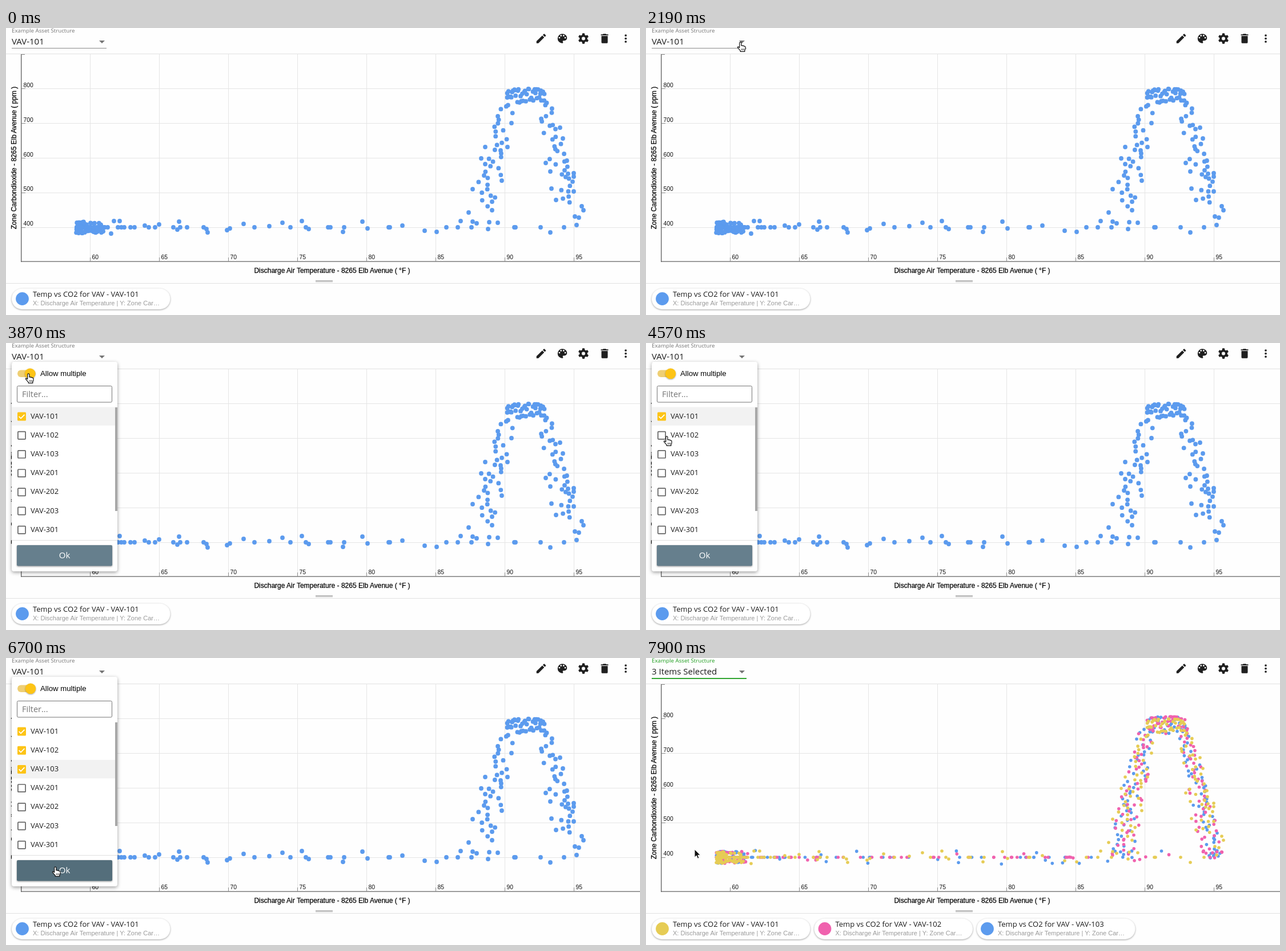
Write an HTML page that moves like this. It is 1110x504 px and loops after 7.99 s.

```html
<!DOCTYPE html>
<html lang="en">
<head>
<meta charset="utf-8">
<title>Scatter chart with asset picker</title>
<style>
  html, body { margin: 0; width: 100%; height: 100%; overflow: hidden; background: #fefefe; }
  svg { display: block; width: 1110px; height: 504px; }
  text { font-family: "Open Sans", "Noto Sans", sans-serif; font-size: 13px; fill: #1c1c1c; white-space: pre; }
  .axis { font-family: "Liberation Sans", Arial, sans-serif; font-size: 12px; fill: #000; }
  .title { stroke: #000; stroke-width: .25px; }
  .tick { font-size: 10.4px; fill: #111; }
  .sub { font-size: 11px; fill: #9a9a9a; }
  .chip { filter: drop-shadow(0 1px 1.5px rgba(0,0,0,.36)); }
  .panel { filter: drop-shadow(0 2px 3px rgba(0,0,0,.38)); }
</style>
</head>
<body>
<svg id="stage" viewBox="0 0 1110 504"></svg>
<script>
const LOOP = 7990;
const BLUE = '#5c9bee', PINK = '#f062ae', GOLD = '#e6cc55', AMBER = '#fdc416';
const PLACE = '8265 Elb Avenue';

const stage = document.getElementById('stage');

function el(tag, attrs, parent = stage, content) {
  const node = document.createElementNS('http://www.w3.org/2000/svg', tag);
  for (const key in attrs) node.setAttribute(key, attrs[key]);
  if (content !== undefined) node.textContent = content;
  parent.appendChild(node);
  return node;
}
const group = (parent = stage, attrs = {}) => el('g', attrs, parent);
const rect = (x, y, width, height, fill, parent, more) => el('rect', { x, y, width, height, fill, ...more }, parent);
const dot = (cx, cy, r, fill, parent) => el('circle', { cx, cy, r, fill }, parent);
const label = (x, y, str, parent, more) => el('text', { x, y, ...more }, parent, str);
const show = (node, on) => node.setAttribute('visibility', on ? 'inherit' : 'hidden');

function random(seed) {
  return () => {
    seed = (seed + 0x6D2B79F5) | 0;
    let t = Math.imul(seed ^ (seed >>> 15), 1 | seed);
    t = (t + Math.imul(t ^ (t >>> 7), 61 | t)) ^ t;
    return ((t ^ (t >>> 14)) >>> 0) / 4294967296;
  };
}

/* ---- Chart frame ---- */
rect(0, 45, 1110, 1, '#e2e2e2');
const grid = group(), outerGrid = group();
for (let i = 0; i < 5; i++) rect(27, 106 + i * 61, 1083, 1, '#e5e5e5', i % 4 ? grid : outerGrid);
for (let i = 0; i < 8; i++) rect(147 + i * 121, 46, 1, 364, '#e5e5e5', i % 7 ? grid : outerGrid);
rect(26, 46, 1.4, 365, '#6a6a6a');
rect(26, 409.4, 1084, 1.3, '#6a6a6a');
rect(27, 46, 6, 1, '#8a8a8a');
for (let i = 0; i < 5; i++) {
  rect(27, 106 + i * 61, 7, 1, '#8a8a8a');
  label(30.5, 104 + i * 60.8, 800 - i * 100, stage, { class: 'axis tick' });
}
for (let i = 0; i < 8; i++) {
  rect(147 + i * 121, 403, 1, 7, '#8a8a8a');
  label(150.5 + i * 121, 406, 60 + i * 5, stage, { class: 'axis tick' });
}
label(571, 430, `Discharge Air Temperature - ${PLACE} ( °F )`, stage, { class: 'axis title', 'text-anchor': 'middle' });
label(0, 0, `Zone Carbondioxide - ${PLACE} ( ppm )`, stage,
  { class: 'axis title', 'text-anchor': 'middle', transform: 'translate(17.6 228) rotate(-90)' });
rect(542, 443, 30, 1, '#999');
rect(542, 445, 30, 1, '#999');
rect(0, 448, 1110, 1, '#e2e2e2');

/* ---- Points ---- */
const floorXs = [173, 178, 196, 202, 207, 218, 225, 250, 261, 293, 305, 317, 435, 498,
  564, 568, 592, 670, 672, 771, 791, 815, 890, 892, 936, 977];
const strays = [
  [184, 361], [189, 339], [199, 339], [243, 347], [268, 345], [300, 354], [303, 340], [346, 350],
  [351, 353], [353, 359], [387, 355], [392, 352], [416, 344], [461, 348], [484, 342], [518, 339],
  [525, 350], [530, 353], [590, 358], [624, 340], [633, 352], [694, 347], [733, 356], [754, 358],
  [796, 339], [810, 324], [817, 283], [817, 340], [824, 343], [832, 229], [839, 209], [839, 239],
  [837, 259], [844, 353], [846, 341], [861, 342], [851, 305], [851, 320], [868, 268], [866, 215],
  [878, 209], [885, 167], [945, 237], [953, 252], [955, 282], [963, 302], [982, 233], [994, 255],
  [994, 261], [994, 287], [984, 256], [1008, 313], [1011, 320], [996, 331], [1003, 333], [999, 346],
  [953, 359], [970, 175], [975, 194]
];

// Dense patch at the cool end: a solid middle row with looser rows around it
function cluster(rnd, n) {
  return Array.from({ length: n }, (_, i) => {
    const x = 123 + rnd() * (i % 3 ? 49 : 15);
    const y = i % 5 < 2 ? 350 : 350 + (rnd() < 0.5 ? -1 : 1) * (3 + 7.5 * rnd());
    return [x, y];
  });
}

// One flank of the arch; u runs from the crest (0) to the foot (1)
function flank(rnd, n, side, top, bottom) {
  return Array.from({ length: n }, (_, i) => {
    const y = top + (bottom - top) * (i + rnd()) / n;
    const u = (y - 107) / 243;
    const outer = side < 0 ? 870 - 80 * u + 20 * u * u : 948 + 70 * u;
    const inner = side < 0 ? 893 - 30 * u - 12 * u * u : 925 + 50 * u;
    return [outer + (inner - outer) * rnd(), y];
  });
}

function crest(rnd, n, top) {
  return Array.from({ length: n }, (_, i) => {
    const x = 876 + 68 * (i + rnd()) / n;
    const edge = ((x - 910) / 36) ** 4 * 7;
    return [x, top + edge + rnd() ** 2 * 30];
  });
}

function tail(rnd, n) {
  return Array.from({ length: n }, () => {
    const x = 174 + 640 * rnd() ** 1.45;
    const y = rnd() < 0.7 ? 350 : 350 + (rnd() * 2 - 1) * 12;
    return [x, y];
  });
}

function mainSeries() {
  const rnd = random(101);
  return [...floorXs.map(x => [x, 350]), ...strays, ...cluster(rnd, 95),
    ...flank(rnd, 32, -1, 130, 314), ...flank(rnd, 34, 1, 122, 308), ...crest(rnd, 42, 107)];
}

function extraSeries(seed) {
  const rnd = random(seed);
  const foot = Array.from({ length: 12 }, (_, i) => [i < 5 ? 830 + rnd() * 100 : 974 + rnd() * 36, 338 + rnd() * 18]);
  return [...cluster(rnd, 70), ...tail(rnd, 48), ...foot, ...flank(rnd, 52, -1, 122, 350),
    ...flank(rnd, 50, 1, 118, 345), ...crest(rnd, 36, 103)];
}

function plot(points, r, color, parent) {
  for (const [x, y] of points) dot(x.toFixed(1), y.toFixed(1), r, color, parent);
}

const single = group(), triple = group();
const main = mainSeries();
plot(main, 3.9, BLUE, single);
plot(extraSeries(7103), 2.8, BLUE, triple);
plot(extraSeries(5102), 2.8, PINK, triple);
plot(main, 2.8, GOLD, triple);

/* ---- Legend ---- */
function chip(i, color, parent) {
  const g = group(parent, { transform: `translate(${i * 284.5} 0)` });
  rect(10, 457.5, 277.5, 36.5, '#fff', g, { rx: 18.2, class: 'chip' });
  dot(28.5, 475.5, 11.4, color, g);
  label(47, 472, `Temp vs CO2 for VAV - VAV-10${i + 1}`, g);
  label(47, 486.5, 'X: Discharge Air Temperature | Y: Zone Car…', g, { class: 'axis sub' });
}
chip(0, BLUE, single);
[GOLD, PINK, BLUE].forEach((color, i) => chip(i, color, triple));

/* ---- Header ---- */
const caption = label(10, 8, 'Example Asset Structure', stage, { style: 'font-size:9.75px' });
const value = label(10, 29.3, '', stage, { style: 'font-size:15px' });
const underline = rect(10, 35, 166, 1, '#8a8a8a');
el('path', { d: 'M163 22h10l-5 5z', fill: '#757575' });

const icon = x => group(stage, { transform: `translate(${x} 18.5) scale(.92) translate(-12 -12)`, fill: '#1f1f1f' });
el('path', { d: 'M3 17.25V21h3.75L17.81 9.94l-3.75-3.75zM20.71 7.04a1 1 0 0 0 0-1.41l-2.34-2.34a1 1 0 0 0-1.41 0l-1.83 1.83 3.75 3.75z' }, icon(937));
const palette = icon(974);
el('path', { d: 'M12 3a9 9 0 0 0 0 18a1.5 1.5 0 0 0 1.1-2.5a1.5 1.5 0 0 1 1.1-2.5H16a5 5 0 0 0 5-5c0-4.4-4-8-9-8z' }, palette);
for (const [x, y] of [[6.5, 10.5], [9.5, 6.5], [14.5, 6.5], [17.5, 10.5]]) dot(x, y, 1.5, '#fefefe', palette);
const gear = icon(1011);
el('circle', { cx: 12, cy: 12, r: 5.3, fill: 'none', stroke: '#1f1f1f', 'stroke-width': 4 }, gear);
for (let a = 0; a < 360; a += 60) el('path', { d: 'M9.2 6L10 2h4l.8 4z', transform: `rotate(${a} 12 12)` }, gear);
el('path', { d: 'M6 19a2 2 0 0 0 2 2h8a2 2 0 0 0 2-2V7H6zM19 4h-3.5l-1-1h-5l-1 1H5v2h14z' }, icon(1048));
for (const y of [6, 12, 18]) dot(12, y, 2, '#1f1f1f', icon(1085));

/* ---- Picker panel ---- */
const ROW = 33.2;
const menu = group();
rect(10, 33, 185, 368, '#fff', menu, { rx: 4, class: 'panel' });
const track = rect(20, 47.5, 32, 12.5, '#9e9e9e', menu, { rx: 6.2 });
const knob = dot(29, 53.8, 9.3, '#fff', menu);
knob.style.filter = 'drop-shadow(0 1px 1px rgba(0,0,0,.35))';
label(60, 58, 'Allow multiple', menu, { class: 'axis', style: 'font-size:13.2px' });
rect(19.5, 75.5, 166, 28.5, '#fff', menu, { rx: 2, stroke: '#757575' });
label(28, 95, 'Filter...', menu, { style: 'font-size:14.5px;fill:#757575' });
const highlight = rect(10, 112.5, 181, 32.5, '#d5d5d5', menu);

const rows = [101, 102, 103, 201, 202, 203, 301].map((id, i) => {
  const g = group(menu, { transform: `translate(0 ${i * ROW})` });
  const text = label(20, 132.7, `VAV-${id}`, g);
  const empty = rect(20.9, 122.4, 13.2, 13.2, '#fff', g, { rx: 1, stroke: '#666', 'stroke-width': 1.7 });
  const checked = group(g);
  rect(20, 121.5, 15, 15, AMBER, checked, { rx: 1.5 });
  el('path', { d: 'M22.6 129l3.4 3.4 6.4-6.6', fill: 'none', stroke: '#fff', 'stroke-width': 1.7 }, checked);
  return { text, empty, checked };
});
rect(191, 113, 4, 182, '#a8a8a8', menu);
rect(10, 346, 185, 1, '#e0e0e0', menu);
const ok = rect(19, 355, 167, 36.5, '#667f8d', menu, { rx: 2 });
ok.style.filter = 'drop-shadow(0 1px 1.5px rgba(0,0,0,.4))';
label(102.5, 378.3, 'Ok', menu, { 'text-anchor': 'middle', style: 'font-size:15px;fill:#fff' });

/* ---- Cursors, hot spot at 0,0 ---- */
const pointer = group();
const arrow = el('path', { d: 'M0 0v14.2l3.3-3.1 2.2 5.2 2.5-1.1-2.2-5h4.5z', fill: '#111', stroke: '#fff', 'stroke-width': 1 }, pointer);
const hand = group(pointer);
el('path', {
  d: 'M-2.3 9.5V1.4a1.6 1.6 0 0 1 3.2 0V6q1.3-.9 2.6.4q1.5-.6 2.4.7q2-.3 2.1 1.6v3.1l-1.2 2.6v2h-7.6v-1.6l-4.6-5.2q-.6-1.5.9-1.7z',
  fill: '#fff', stroke: '#111', 'stroke-width': 1.2, 'stroke-linejoin': 'round'
}, hand);
el('path', { d: 'M1.4 11.2v3M3.4 11.2v3M5.4 11.2v3', stroke: '#111', 'stroke-width': .8 }, hand);

/* ---- Timeline ---- */
const linear = p => p;
const easeOut = p => 1 - (1 - p) ** 2;
const easeInOut = p => p * p * (3 - 2 * p);

// start, end, steps, x, y, easing
const moves = [
  [530, 530, 1, 1042, 496, linear],
  [680, 1030, 5, 628, 283, easeOut],
  [1300, 2010, 9, 168, 29, easeInOut],
  [2100, 2190, 2, 166, 25, linear],
  [2980, 3510, 7, 40, 54, easeOut],
  [4130, 4570, 6, 37, 164, easeInOut],
  [4660, 4830, 3, 31, 167, linear],
  [5010, 5540, 7, 31, 194, easeInOut],
  [5890, 6430, 7, 80, 346, easeInOut],
  [6520, 6700, 3, 87, 367, easeOut],
  [7700, 7900, 3, 85, 336, easeOut]
];

// Share done after the last whole step; the first step lands at start.
function stepped(t, start, end, n) {
  if (t < start) return 0;
  if (t >= end) return 1;
  return (Math.floor((t - start) / (end - start) * (n - 1) + 0.02) + 1) / n;
}

function cursorAt(t) {
  let x = 1042, y = 496;
  for (const [start, end, n, tx, ty, ease] of moves) {
    const p = ease(stepped(t, start, end, n));
    x += (tx - x) * p;
    y += (ty - y) * p;
  }
  return [x, y];
}

function render(t) {
  const [x, y] = cursorAt(t);
  show(pointer, t >= 530);
  pointer.setAttribute('transform', `translate(${x.toFixed(1)} ${y.toFixed(1)})`);
  const isHand = t >= 2100 && t < 7060;
  show(hand, isHand);
  show(arrow, !isHand);

  const opened = stepped(t, 2360, 2620, 4), closed = stepped(t, 6880, 7060, 3);
  show(menu, opened > 0 && closed < 1);
  menu.setAttribute('opacity', Math.min(1, opened * 1.4) * (1 - closed));
  const grow = 0.8 + 0.2 * easeOut(opened);
  menu.setAttribute('transform', `translate(0 ${33 * (1 - grow)}) scale(1 ${grow})`);

  const multi = t >= 3690;
  const slid = stepped(t, 3690, 3950, 4);
  knob.setAttribute('cx', 29 + 14 * easeOut(slid));
  knob.setAttribute('fill', multi ? AMBER : '#fff');
  track.setAttribute('fill', multi ? '#efcf74' : '#9e9e9e');

  const picked = !multi ? 0 : t < 4750 ? 1 : t < 5710 ? 2 : 3;
  rows.forEach(({ text, empty, checked }, i) => {
    text.setAttribute('x', multi ? 43 : 20);
    text.style.fill = !multi && i === 0 ? '#4a94f0' : '';
    show(empty, multi && i >= picked);
    show(checked, i < picked);
  });
  highlight.setAttribute('y', 112.5 + Math.max(0, picked - 1) * ROW);
  highlight.setAttribute('fill', multi ? '#f2f2f2' : '#d5d5d5');
  ok.setAttribute('fill', t >= 6520 ? '#546e7b' : '#667f8d');

  const applied = t >= 6970;
  value.textContent = applied ? '3 Items Selected' : 'VAV-101';
  caption.style.fill = applied ? '#1c9c1c' : '#757575';
  underline.setAttribute('fill', applied ? '#1c9c1c' : '#8a8a8a');
  underline.setAttribute('height', applied ? 1.8 : 1);

  const loaded = t >= 7230;
  show(single, !loaded);
  show(outerGrid, !loaded);
  show(triple, loaded);
}

const began = performance.now();
function tick() {
  render((performance.now() - began) % LOOP);
  requestAnimationFrame(tick);
}
tick();
</script>
</body>
</html>
```
